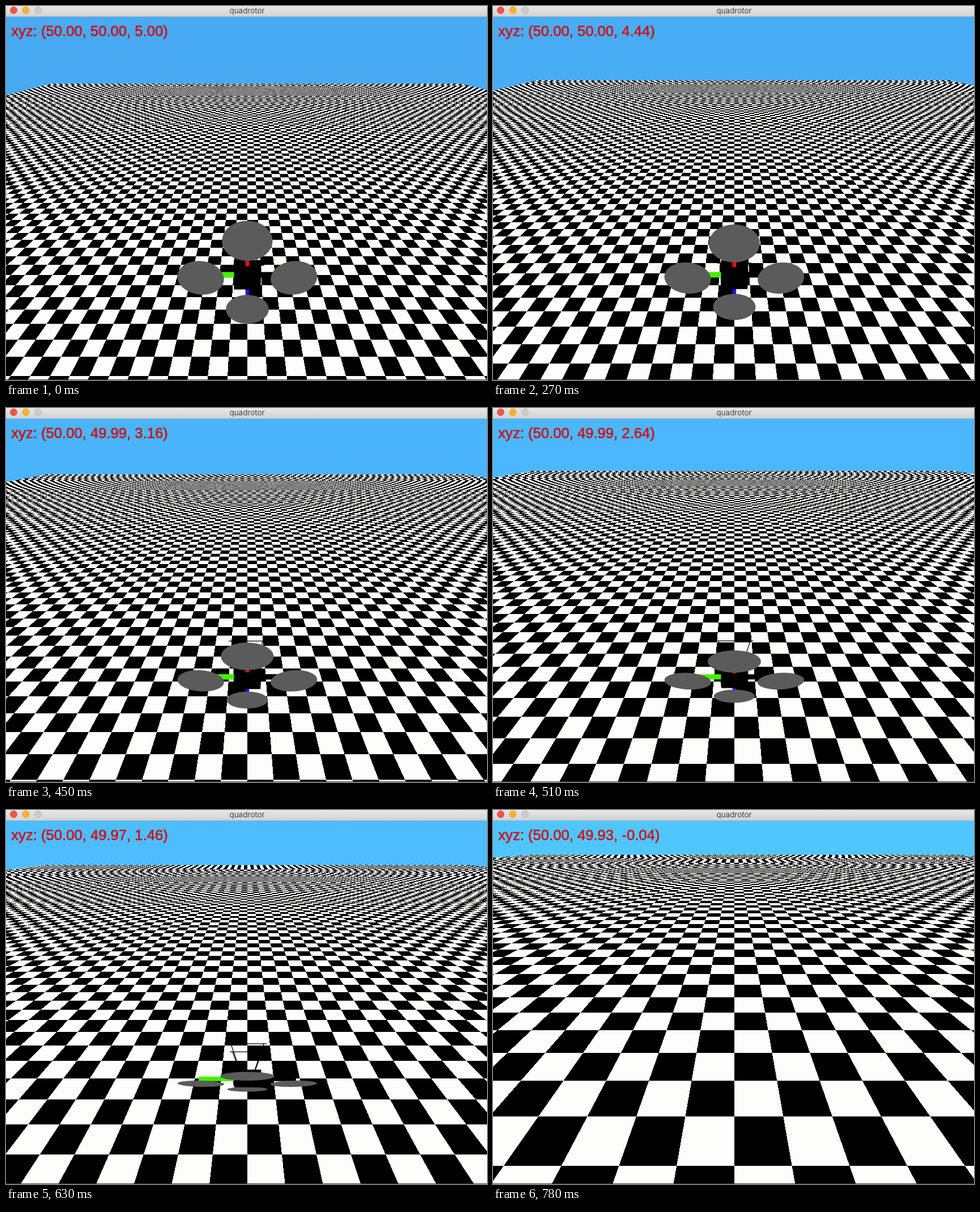
Animation, 849 px wide and 659 px high, one loop 810 ms. Source, as an HTML page with a canvas:

```html
<!DOCTYPE html>
<html lang="en">
<head>
<meta charset="utf-8">
<title>quadrotor</title>
<style>
  html, body { margin: 0; width: 100%; height: 100%; overflow: hidden; background: #000; }
  canvas { display: block; width: 849px; height: 659px; }
</style>
</head>
<body>
<canvas id="stage" width="849" height="659"></canvas>
<script>
const W = 849, H = 659, BAR = 19;
const ctx = document.getElementById('stage').getContext('2d');
const img = ctx.createImageData(W, H);
const pixels = new Uint32Array(img.data.buffer);

// Camera: pitched 30 degrees down, 2.5 behind and 2.5 above the craft
const COS = Math.cos(Math.PI / 6), SIN = 0.5;
const FOCAL = 502.6, CX = 425.9, CY = 339, BACK = 2.5, RISE = 2.5;
const HORIZON = CY - FOCAL * SIN / COS;
const TILE = 0.5, LEFT = -34, RIGHT = 37;

// Flight path: step, height, drift, tilt in degrees
const PATH = [
  [0, 5, 0, 0], [3, 4.91, 0, 0.4], [7, 4.44, 0.002, 4], [13, 3.16, 0.01, 18],
  [17, 2.06, 0.02, 30], [21, 0.85, 0.044, 43.3], [24, -0.04, 0.067, 54]
];

function slope(i, k) {
  if (i === 0) return 0;
  const a = PATH[i - 1], b = PATH[Math.min(i + 1, PATH.length - 1)];
  return (b[k] - a[k]) / (b[0] - a[0]);
}

function along(step, k) {
  let i = 0;
  while (i < PATH.length - 2 && step > PATH[i + 1][0]) i++;
  const a = PATH[i], b = PATH[i + 1], d = b[0] - a[0];
  const t = (step - a[0]) / d, t2 = t * t, t3 = t2 * t;
  return (2 * t3 - 3 * t2 + 1) * a[k] + (t3 - 2 * t2 + t) * d * slope(i, k)
    + (3 * t2 - 2 * t3) * b[k] + (t3 - t2) * d * slope(i + 1, k);
}

const rgba = (r, g, b) => (255 << 24 | b << 16 | g << 8 | r) >>> 0;
const DARK = rgba(0, 0, 0), LIGHT = rgba(253, 253, 252);

function drawGround(height, y) {
  const fall = Math.min(1, (5 - height) / 5);
  const sky = rgba(71 + 9 * fall, 170 + 28 * fall, Math.min(255, 243 + 26 * fall));
  const h = height + RISE, eye = y + BACK;
  for (let row = 0; row < H; row++) {
    const start = row * W, below = row + 0.5 - HORIZON;
    const depth = FOCAL * h / (COS * below);
    const world = eye - (depth - h * SIN) / COS;
    if (below <= 0 || world < 0) {
      pixels.fill(sky, start, start + W);
      continue;
    }
    const line = Math.floor(world / TILE), scale = depth / FOCAL;
    for (let col = 0; col < W; col++) {
      const x = (col + 0.5 - CX) * scale;
      pixels[start + col] = x < LEFT || x > RIGHT ? sky
        : (Math.floor(x / TILE) + line) & 1 ? DARK : LIGHT;
    }
  }
  ctx.putImageData(img, 0, 0);
}

function project([x, b, z]) {
  const depth = BACK * COS + RISE * SIN - b * COS - z * SIN;
  const down = RISE * COS - BACK * SIN + b * SIN - z * COS;
  return [CX + FOCAL * x / depth, CY + FOCAL * down / depth];
}

function hull(points) {
  points.sort((p, q) => p[0] - q[0] || p[1] - q[1]);
  const half = list => {
    const out = [];
    for (const p of list) {
      while (out.length > 1) {
        const a = out[out.length - 2], b = out[out.length - 1];
        if ((b[0] - a[0]) * (p[1] - a[1]) - (b[1] - a[1]) * (p[0] - a[0]) > 0) break;
        out.pop();
      }
      out.push(p);
    }
    out.pop();
    return out;
  };
  return half(points).concat(half(points.slice().reverse()));
}

// Part of a convex set of points that lies above the ground
function above(points, floor) {
  const out = points.filter(p => p[2] >= floor);
  if (out.length === points.length) return out;
  const under = points.filter(p => p[2] < floor);
  const cuts = [];
  for (const p of out) for (const q of under) {
    const t = (floor - p[2]) / (q[2] - p[2]);
    cuts.push(p.map((v, i) => v + (q[i] - v) * t));
  }
  return out.concat(cuts);
}

function drawCraft(height, tilt) {
  const c = Math.cos(tilt), s = Math.sin(tilt);
  // side, up along the frame, out along the rotor axis
  const place = (l, u, n) => [l, u * s + n * c, u * c - n * s];

  function solid(points, color) {
    const shape = hull(above(points, -height).map(project));
    if (shape.length < 3) return;
    ctx.fillStyle = color;
    ctx.beginPath();
    shape.forEach(p => ctx.lineTo(p[0], p[1]));
    ctx.fill();
  }
  function box(l0, l1, u0, u1, n, color) {
    const points = [];
    for (const l of [l0, l1]) for (const u of [u0, u1]) for (const m of [-n, n])
      points.push(place(l, u, m));
    solid(points, color);
  }
  function rotor(l, u) {
    const points = [];
    for (let i = 0; i < 36; i++) {
      const a = i * Math.PI / 18;
      points.push(place(l + 0.274 * Math.cos(a), u + 0.274 * Math.sin(a), 0.06));
    }
    solid(points, '#5b5b5b');
  }
  function wire(a, b) {
    const p = project(place(...a)), q = project(place(...b));
    ctx.beginPath();
    ctx.moveTo(p[0], p[1]);
    ctx.lineTo(q[0], q[1]);
    ctx.stroke();
  }

  const ARM = 0.55, END = 0.58, B = 0.16, T = 0.023;
  ctx.strokeStyle = '#000';
  ctx.lineWidth = 1.3;
  for (const u of [-0.2, 0.2]) {
    wire([-0.23, u, -0.376], [0.23, u, -0.376]);
    for (const k of [-1, 1]) wire([k * 0.085, u * 0.3, -0.08], [k * 0.195, u, -0.376]);
  }
  box(-T, T, -END, -B, T, '#3200ff');
  rotor(0, -ARM);
  box(-B, B, -B, B, 0.08, '#000');
  box(-END, -B, -T, T, T, '#46f000');
  box(B, END, -T, T, T, '#000');
  box(-T, T, B, 0.3, T, '#ee0a0a');
  rotor(-ARM, 0);
  rotor(ARM, 0);
  rotor(0, ARM);
}

function drawWindow() {
  const g = ctx.createLinearGradient(0, 0, 0, BAR);
  g.addColorStop(0, '#e8e7e8');
  g.addColorStop(1, '#d2d1d2');
  ctx.fillStyle = g;
  ctx.fillRect(0, 0, W, BAR);
  ctx.fillStyle = '#b9b9b9';
  ctx.fillRect(0, BAR - 1, W, 1);
  [['#f2544d', '#dd443e'], ['#f6b42c', '#dea02a'], ['#cdcccd', '#b9b8b9']].forEach(([fill, rim], i) => {
    ctx.beginPath();
    ctx.arc(13.5 + 21.5 * i, 7.5, 6, 0, 7);
    ctx.fillStyle = fill;
    ctx.fill();
    ctx.lineWidth = 1;
    ctx.strokeStyle = rim;
    ctx.stroke();
  });
  ctx.fillStyle = '#424242';
  ctx.font = '13.4px Inter, Roboto, sans-serif';
  ctx.textAlign = 'center';
  ctx.fillText('quadrotor', 425.5, 12.5);
  ctx.fillStyle = '#3a3a3a';
  ctx.fillRect(0, H - 1, W, 1);
}

function draw(step) {
  const z = along(step, 1), y = 50 - along(step, 2);
  drawGround(z, y);
  if (z > 0) drawCraft(z, along(step, 3) * Math.PI / 180);
  drawWindow();
  const label = `xyz: (50.00, ${y.toFixed(2)}, ${z.toFixed(2)})`;
  ctx.fillStyle = ctx.strokeStyle = '#d30c14';
  ctx.lineWidth = 0.6;
  ctx.font = '25.65px "Liberation Sans", Arial, sans-serif';
  ctx.textAlign = 'left';
  ctx.fillText(label, 9.3, 53);
  ctx.strokeText(label, 9.3, 53);
}

const LOOP = 810, HOLD = 90, TICK = 30;
let shown = -1, begin = null;
function frame(now) {
  if (begin === null) begin = now;
  const t = (now - begin) % LOOP;
  const step = t < HOLD ? 0 : Math.floor((t - HOLD) / TICK) + 1;
  if (step !== shown) draw(shown = step);
  requestAnimationFrame(frame);
}
draw(shown = 0);
requestAnimationFrame(frame);
</script>
</body>
</html>
```
